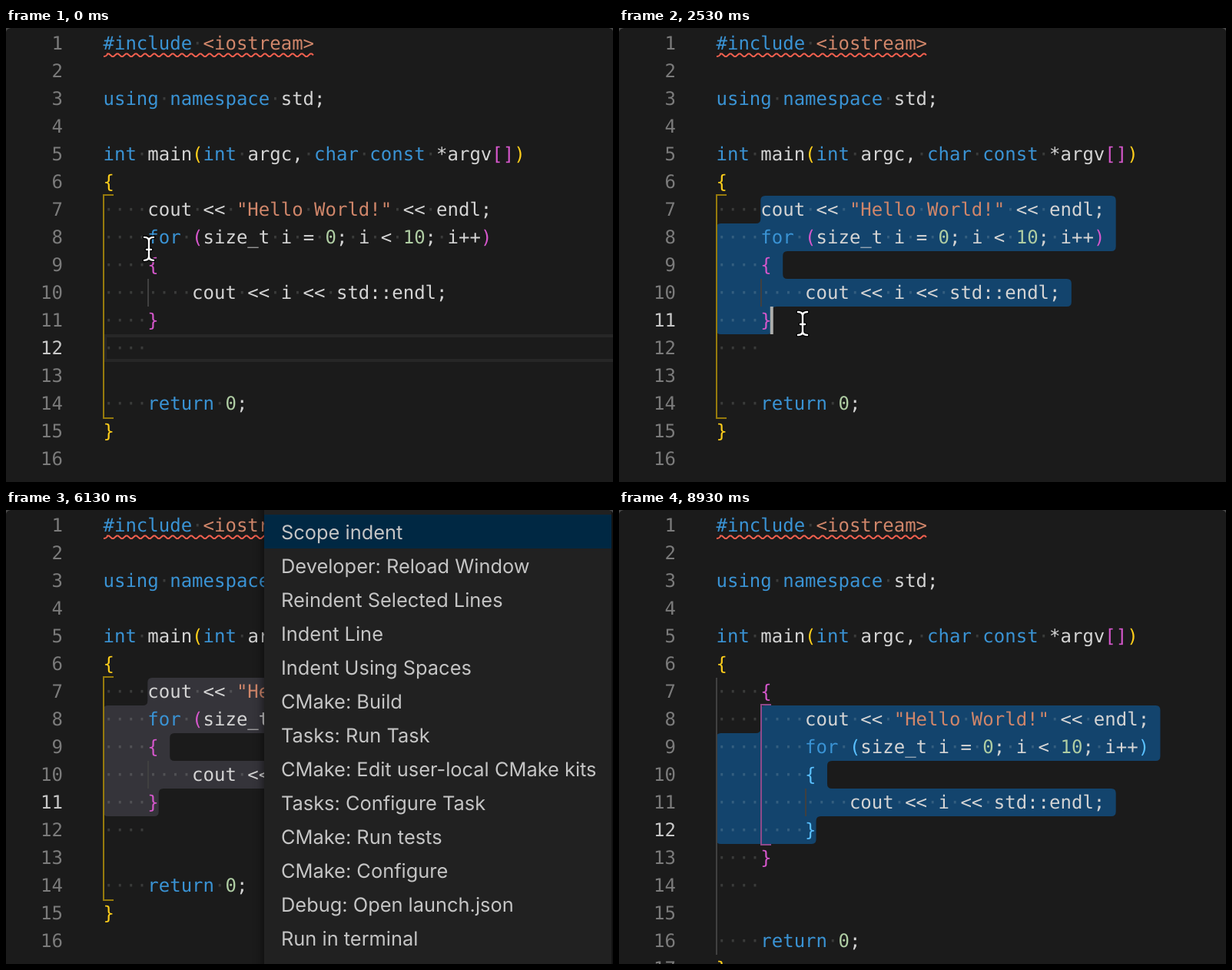
Recreate the animation shown at these times as an HTML page. Size 790 px wide and 590 px high, loop 8990 ms.

```html
<!DOCTYPE html>
<html lang="en">
<head>
<meta charset="utf-8">
<title>Scope indent</title>
<style>
  html, body { margin: 0; width: 100%; height: 100%; overflow: hidden; background: #1b1b1b; }
  svg { display: block; width: 790px; height: 590px; }
  text { text-rendering: geometricPrecision; }
  .code { font: 24px "DejaVu Sans Mono", "Liberation Mono", monospace; fill: #d4d4d4; }
  .code .space { fill: rgba(227, 228, 226, .16); }
  .code .string { fill: #d0866a; }
  .code .keyword { fill: #3a93d4; }
  .code .number { fill: #afcda3; }
  .code .depth0 { fill: #ffcf1b; }
  .code .depth1 { fill: #d657cc; }
  .code .depth2 { fill: #5ac0ff; }
  .code .gutter { fill: #7b7b7b; text-anchor: end; }
  .code .gutter.active { fill: #c8c8c8; }
  .guide { fill: none; stroke: #404040; stroke-width: 2; }
  .guide.gold { stroke: #967a0c; }
  .guide.magenta { stroke: #8f4a8a; }
  .squiggle { fill: none; stroke: #f2604f; stroke-width: 2; }
  .menu { font: 25.4px Inter, Roboto, sans-serif; fill: #c5c5c5; }
  #panel { fill: #212121; filter: drop-shadow(0 0 7px #000a); }
  #pointer { fill: none; stroke-linecap: round; }
</style>
</head>
<body>
<svg id="stage" viewBox="0 0 790 590">
  <rect width="790" height="590" fill="#1b1b1b"/>
  <rect id="lineBox" x="129" width="670" height="32" fill="none" stroke="#272727" stroke-width="4"/>
  <path id="selection"/>
  <g id="views"></g>
  <rect id="caret" width="4" height="36" fill="#aeafad"/>
  <g id="pointer">
    <path id="beam" d="M-6-15Q0-15 0-10V10Q0 15-6 15M6-15Q0-15 0-10M0 10Q0 15 6 15M-3 1H3" stroke="#000" stroke-width="5"/>
    <use href="#beam" style="stroke:#fff"/>
  </g>
  <g id="menu" class="menu">
    <rect id="panel" x="336" y="-10" width="452" height="620"/>
    <rect x="336" y="6" width="452" height="44" fill="#002843"/>
  </g>
  <path d="M0 0H6Q1 1 0 5ZM790 0H785Q789 1 790 4Z" fill="#4a4a4a"/>
</svg>
<script>
const LOOP = 8990, CLICK = 530, MENU_OPEN = 2670, INDENTED = 6230;
const ROW = 36, CHAR = 14.449, LEFT = 126.5;
const POINTER_LAG = 100;

const $ = id => document.getElementById(id);
const top_ = line => 2 + (line - 1) * ROW;
const colX = col => LEFT + col * CHAR;
const show = (el, on) => el.setAttribute('visibility', on ? 'visible' : 'hidden');

function add(parent, tag, attrs, content = '') {
  const el = document.createElementNS('http://www.w3.org/2000/svg', tag);
  for (const name in attrs) el.setAttribute(name, attrs[name]);
  el.textContent = content;
  return parent.appendChild(el);
}

const head = ['#include <iostream>', '', 'using namespace std;', '',
  'int main(int argc, char const *argv[])', '{'];
const body = ['    cout << "Hello World!" << endl;', '    for (size_t i = 0; i < 10; i++)',
  '    {', '        cout << i << std::endl;', '    }'];
const tail = ['    ', '', '    return 0;', '}', ''];
const plain = [...head, ...body, ...tail];
const scoped = [...head, '    {', ...body.map(s => '    ' + s), '    }', ...tail];

const TOKEN = new RegExp([
  '(?<space> +)', '(?<string>"\\w+|\\w+!"|<iostream>)',
  '(?<keyword>#include|\\b(?:using|namespace|int|char|const|for|return)\\b)',
  '(?<number>\\b\\d+)', '(?<bracket>[()[\\]{}])', '(?<other>\\w+|.)'
].join('|'), 'g');

function buildView(lines, guides) {
  const group = add($('views'), 'g', { class: 'code' });
  for (const [kind, d] of guides) add(group, 'path', { class: 'guide ' + kind, d });
  add(group, 'path', { class: 'squiggle', d: 'M127 37q3 0 4.5-2' + 't3-2 3 2 3 2 3-2 3-2 3 2 3 2 3-2'.slice(0, 0) + wave() });
  let depth = 0;
  const gutters = lines.map((line, i) => {
    const y = top_(i + 1) + 26;
    const row = add(group, 'text', { x: LEFT, y });
    for (const { 0: word, groups } of line.matchAll(TOKEN)) {
      let kind = Object.keys(groups).find(name => groups[name] !== undefined);
      if (kind === 'bracket') kind = 'depth' + ('([{'.includes(word) ? depth++ : --depth);
      add(row, 'tspan', { class: kind }, kind === 'space' ? '·'.repeat(word.length) : word);
    }
    return add(group, 'text', { class: 'gutter', x: 74, y }, i + 1);
  });
  return { group, gutters, lines };
}

function wave() {
  let d = '';
  for (let x = 132; x <= 400; x += 2) d += `L${x} ${(35.2 - 2 * Math.cos((x - 127) * Math.PI / 6 + Math.PI)).toFixed(2)}`;
  return d;
}

const views = [
  buildView(plain, [['gold', 'M140 217H127V507H140'], ['', 'M185 326V362']]),
  buildView(scoped, [['', 'M127 218V578M243 362V398'], ['magenta', 'M198 253H185V435H198']])
];

['Scope indent', 'Developer: Reload Window', 'Reindent Selected Lines', 'Indent Line',
  'Indent Using Spaces', 'CMake: Build', 'Tasks: Run Task', 'CMake: Edit user-local CMake kits',
  'Tasks: Configure Task', 'CMake: Run tests', 'CMake: Configure', 'Debug: Open launch.json',
  'Run in terminal'
].forEach((label, i) => add($('menu'), 'text', { x: 358, y: 38 + i * 44 }, label));

// Pointer path: time, x, y
const PATH = [[0, 186, 287], [330, 184, 244], [CLICK, 184, 244], [900, 238, 328],
  [1130, 242, 376], [1270, 242, 384], [1600, 239, 384], [LOOP, 239, 384]];

function pointerAt(t) {
  const i = PATH.findIndex((p, k) => k && t <= p[0]);
  const [a, b] = [PATH[i - 1], PATH[i]];
  const k = (t - a[0]) / (b[0] - a[0]);
  return { x: a[1] + (b[1] - a[1]) * k, y: a[2] + (b[2] - a[2]) * k };
}

function caretAt(t) {
  if (t >= INDENTED) return { line: 12, col: 9 };
  if (t < CLICK) return { line: 12, col: 4 };
  const { x, y } = pointerAt(Math.max(CLICK, t - POINTER_LAG));
  const line = Math.floor((y - 2) / ROW) + 1;
  return { line, col: Math.min(Math.round((x - LEFT) / CHAR), plain[line - 1].length) };
}

// Outline of the selected rows with rounded outer and inner corners
function selectionPath(lines, start, end) {
  const right = [], left = [];
  for (let n = start.line; n <= end.line; n++) {
    const x0 = colX(n === start.line ? start.col : 0);
    const x1 = colX(n === end.line ? end.col : lines[n - 1].length + 1);
    if (x1 <= x0) continue;
    const y = top_(n);
    right.push([x1, y], [x1, y + ROW]);
    left.unshift([x0, y + ROW], [x0, y]);
  }
  const all = [...right, ...left];
  const at = (list, i) => list[(i + list.length) % list.length];
  const points = all.filter((p, i) => at(all, i - 1)[0] !== p[0] || at(all, i + 1)[0] !== p[0]);
  const toward = (p, q) => {
    const dist = Math.hypot(q[0] - p[0], q[1] - p[1]) || 1;
    const k = Math.min(6, dist / 2) / dist;
    return [p[0] + (q[0] - p[0]) * k, p[1] + (q[1] - p[1]) * k];
  };
  return points.map((p, i) =>
    `${i ? 'L' : 'M'}${toward(p, at(points, i - 1))}Q${p} ${toward(p, at(points, i + 1))}`
  ).join('') + (points.length ? 'Z' : '');
}

function caretVisible(t) {
  if (t < CLICK || (t >= MENU_OPEN && t < INDENTED)) return false;
  if (t < 1200) return true;
  return (t - (t < INDENTED ? 1200 : INDENTED)) % 1000 < 500;
}

function draw(t) {
  const done = t >= INDENTED, menuOpen = t >= MENU_OPEN && !done;
  const view = views[+done], caret = caretAt(t);
  const start = { line: done ? 8 : 7, col: 4 };
  const outline = t < CLICK ? '' : selectionPath(view.lines, start, caret);

  views.forEach(v => show(v.group, v === view));
  view.gutters.forEach((el, i) => el.classList.toggle('active', i + 1 === caret.line));
  $('selection').setAttribute('d', outline);
  $('selection').setAttribute('fill', menuOpen ? '#35343a' : '#13446d');
  show($('lineBox'), !outline);
  $('lineBox').setAttribute('y', top_(caret.line) + 2 - 2 + 2);
  $('caret').setAttribute('x', colX(caret.col) - 2);
  $('caret').setAttribute('y', top_(caret.line));
  show($('caret'), caretVisible(t));

  const { x, y } = pointerAt(t);
  $('pointer').setAttribute('transform', `translate(${x} ${y})`);
  show($('pointer'), t < MENU_OPEN);
  $('beam').setAttribute('stroke', '#000');
  show($('menu'), menuOpen);
}

$('pointer').querySelector('use').remove();
add($('pointer'), 'path', { d: $('beam').getAttribute('d'), stroke: '#fff', 'stroke-width': 2.4 });

const begin = performance.now();
function tick() {
  draw((performance.now() - begin) % LOOP);
  requestAnimationFrame(tick);
}
draw(0);
tick();
</script>
</body>
</html>
```
